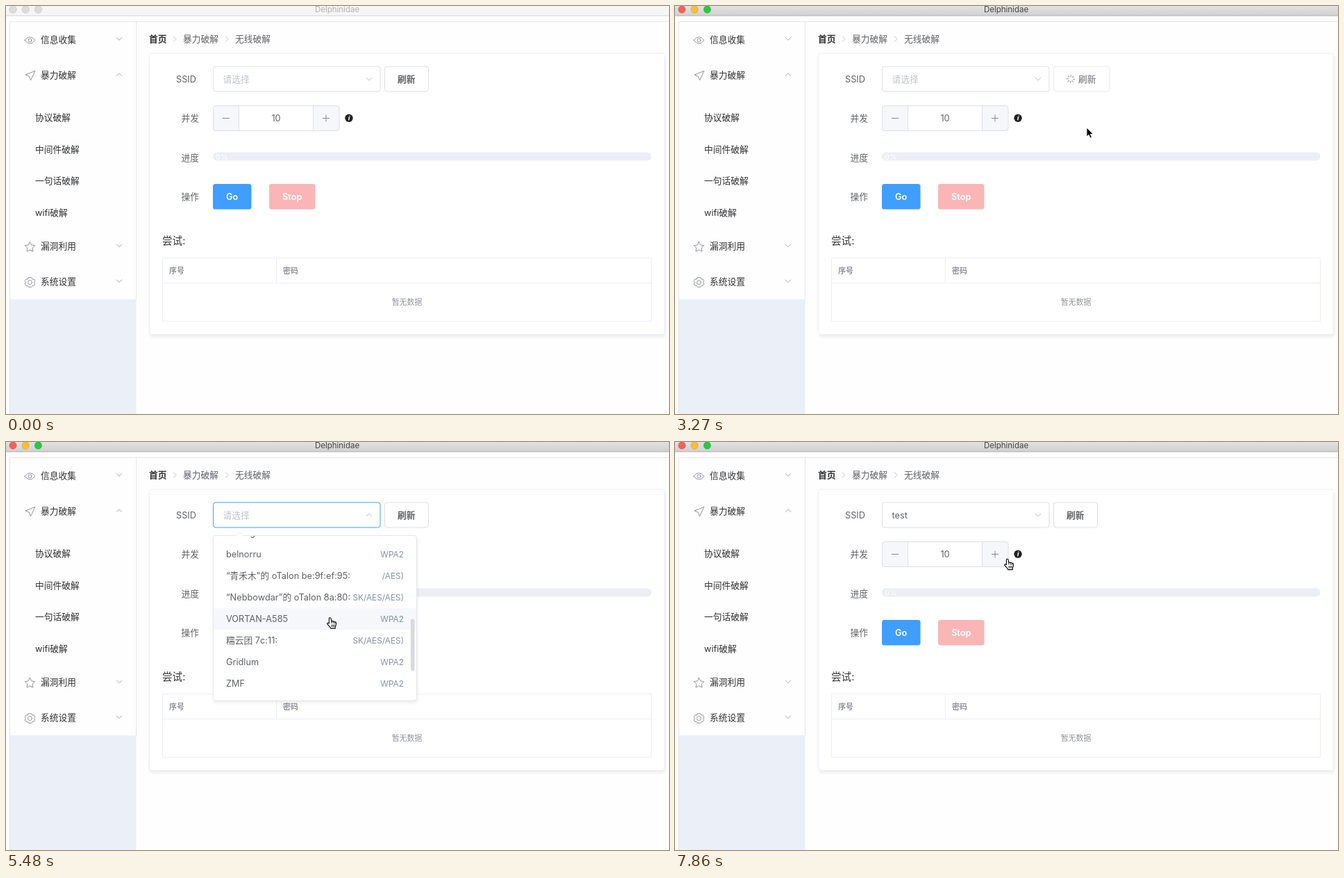
Recreate the animation shown at these times as an HTML page. Size 955 by 587 pixels, loop 8000 ms.

```html
<!DOCTYPE html>
<html lang="zh-CN">
<head>
<meta charset="utf-8">
<title>Delphinidae</title>
<style>
html, body { margin: 0; width: 100%; height: 100%; overflow: hidden; background: #fefefe; }
svg { display: block; width: 955px; height: 587px; }
text { font: 12.75px Inter, "Noto Sans CJK SC", "Noto Sans CJK", sans-serif; fill: #606266; white-space: pre; }
.dark { fill: #303133; }
.pale { fill: #c0c4cc; }
.small { font-size: 10.95px; fill: #909399; }
.bold { font-weight: 700; }
.medium { font-weight: 600; }
.kind { font-size: 11.85px; fill: #8492a6; }
.picked { font-weight: 700; }
.picked.name { fill: #409eff; }
.icon { fill: none; stroke: #909399; stroke-width: 1; stroke-linejoin: round; stroke-linecap: round; }
.card { filter: drop-shadow(1px 3px 2px rgba(0, 0, 0, .07)); }
</style>
</head>
<body>
<svg id="stage" viewBox="0 0 955 587"></svg>
<script>
const LOOP = 8000, ROW = 31, LIST_TOP = 140.5;

// Markup helpers
const rect = (x, y, w, h, fill, stroke = 'none', r = 0, more = '') =>
  `<rect x="${x}" y="${y}" width="${w}" height="${h}" rx="${r}" fill="${fill}" stroke="${stroke}" ${more}/>`;
const text = (x, mid, str, cls = '', more = '') =>
  `<text x="${x}" y="${mid + 4.6}" class="${cls}" ${more}>${str}</text>`;
const line = (d, stroke, more = '') => `<path d="${d}" fill="none" stroke="${stroke}" ${more}/>`;
const chevron = (x, y, turn = 0, stroke = '#a3a6ad', id = '') =>
  `<path ${id && `id="${id}"`} d="M-4 -2L0 2L4 -2" fill="none" stroke="${stroke}" transform="translate(${x} ${y}) rotate(${turn})"/>`;
const middle = 'text-anchor="middle"';

const networks = [
  'Zumfel-HQ', 'Antique', 'Zumfel-Web', 'TuvoK', 'VORTAN Pelm 9', 'Quelvo 9', 'Drolu', 'ZMF-WLAN',
  'Guest-5F', 'office', 'lobby_3A20', 'hall-ng', 'belnorru',
  ['“青禾木”的 oTalon be:9f:ef:95:', '/AES)'], ['“Nebbowdar”的 oTalon 8a:80:', 'SK/AES/AES)'],
  'VORTAN-A585', ['糯云团 7c:11:', 'SK/AES/AES)'], 'Gridlum', 'ZMF', 'ZMF-APP', 'Dovel_6028', 'test', 'set'
].map(n => Array.isArray(n) ? n : [n, 'WPA2']);

const titleBar = `
  <linearGradient id="bar" x2="0" y2="1"><stop stop-color="#e2e2e2"/><stop offset="1" stop-color="#d0d0d0"/></linearGradient>
  ${['#f6f6f6', 'url(#bar)'].map((fill, on) => `<g id="bar${on}">
    ${rect(0, 0, 955, 14, fill)}${line('M0 14H955', on ? '#b2b2b2' : '#d4d4d4')}
    ${['#fc5f57', '#fdbd2f', '#28c940'].map((c, i) =>
      `<circle cx="${10 + 18.2 * i}" cy="5" r="5.3" fill="${on ? c : '#dcdcdc'}" stroke="${on ? '#0002' : '#cfcfcf'}" stroke-width=".8"/>`).join('')}
    ${text(477, 4.7, 'Delphinidae', '', `${middle} style="font-size:11.5px;fill:${on ? '#454545' : '#b2b2b2'}"`)}
  </g>`).join('')}`;

const star = Array.from({length: 10}, (_, i) => {
  const a = (i / 5 - .5) * Math.PI, r = i % 2 ? 3.9 : 7.6;
  return `${(34.5 + r * Math.cos(a)).toFixed(1)} ${(347 + r * Math.sin(a)).toFixed(1)}`;
}).join('L');

const sidebar = `
  ${rect(5, 422, 182.5, 165, '#ebeff8')}
  ${rect(5.5, 274.5, 182, 45.5, '#e8f3fe', 'none', 0, 'id="menuGlow"')}
  ${line('M955 22.5H5.5V587M187.5 22.5V422', '#e6e6e6')}
  ${[['信息收集', 48], ['暴力破解', 99.5], ['漏洞利用', 345.5], ['系统设置', 396.5]].map(([s, y], i) =>
    text(50, y, s, 'dark') + chevron(163, y - .8, i === 1 ? 180 : 0)).join('')}
  ${['协议破解', '中间件破解', '一句话破解', 'wifi破解'].map((s, i) => text(42, 160.3 + 45.6 * i, s, 'dark')).join('')}
  <g class="icon">
    <path d="M27 49.3Q34.5 39.8 42 49.3Q34.5 58.8 27 49.3Z"/><circle cx="34.5" cy="49.3" r="2.4"/>
    <path d="M41.5 93.5L28 99L33.3 101L35.5 106.5Z"/>
    <path d="M${star}Z"/>
    <path d="M32.3 390.8H36.7L38 393L40.4 393L41.8 395.6L40.4 397.6L41.8 400L40.2 402.3L38 402.3L36.7 404.4H32.3L31 402.3L28.8 402.3L27.2 400L28.6 397.6L27.2 395.6L28.6 393L31 393Z"/>
    <circle cx="34.5" cy="397.6" r="3"/>
  </g>`;

const refresh = (id, w, fill, stroke, ink, x, more = '') => `<g id="${id}">
  ${rect(545.5, 87, w, 36, fill, stroke, 3.6)}${text(x, 105, '刷新', 'medium', `style="fill:${ink}"`)}${more}</g>`;
const rays = Array.from({length: 8}, (_, i) =>
  `<path d="M0 -3V-5.8" stroke="#96989c" stroke-width="1.1" transform="rotate(${45 * i})"/>`).join('');

const form = `
  ${text(206, 47.5, '首页', 'dark bold')}${chevron(243, 47.5, -90, '#c0c4cc')}
  ${text(255, 47.5, '暴力破解')}${chevron(318, 47.5, -90, '#c0c4cc')}${text(330, 47.5, '无线破解')}
  ${rect(206.5, 68, 742, 404.5, '#fff', '#ebeef5', 3.6, 'class="card"')}
  ${text(245, 105, 'SSID')}
  ${['并发', '进度', '操作'].map((s, i) => text(252.5, 161.5 + 56.4 * i, s)).join('')}
  ${rect(298.5, 87, 240.5, 36, '#fff', '#dcdfe6', 3.6, 'id="select"')}
  ${text(312.5, 105, '请选择', 'pale', 'id="hint"')}${text(312.5, 105, 'test', '', 'id="value"')}
  ${chevron(523, 105, 0, '#c0c4cc', 'selectArrow')}
  ${refresh('idle', 63, '#fff', '#dcdfe6', '#606266', 564)}
  ${refresh('hover', 63, '#ecf5ff', '#c6e2ff', '#409eff', 564)}
  ${refresh('loading', 80.5, '#fff', '#e8eaef', '#97999c', 581, `<g id="spinner">${rays}</g>`)}
  ${rect(298.5, 143.5, 181.5, 36, '#f5f7fa', '#dcdfe6', 3.6)}${rect(335.5, 143.5, 107, 36, '#fff', '#dcdfe6')}
  ${text(389, 161.5, '10', '', middle)}
  ${line('M312 161.5H322M456 161.5H466M461 156.5V166.5', '#85888e')}
  <circle cx="494" cy="161.2" r="5.7" fill="#222"/>
  <path d="M493.4 160.2H494.6L493.6 164.3M494.9 157.6V158.4" fill="none" stroke="#fff" stroke-width="1.4"/>
  ${rect(298, 210.5, 631.5, 12, '#ebeef5', 'none', 6)}
  ${text(302, 216.3, '0%', '', 'style="font-size:10.95px;fill:#fff"')}
  ${rect(298, 256, 55.5, 36.5, '#409eff', 'none', 3.6)}${text(325.7, 274.3, 'Go', 'medium', `${middle} style="fill:#fff"`)}
  ${rect(379, 256, 66.5, 36.5, '#fab6b6', 'none', 3.6)}${text(412.2, 274.3, 'Stop', 'medium', `${middle} style="fill:#fff"`)}
  ${text(225, 338, '尝试:', 'dark', 'style="font-size:14.6px"')}
  ${line('M225.5 362.5H929.5V453.5H225.5ZM225.5 398.5H929.5M389.5 362.5V398.5', '#ebeef5')}
  ${text(235, 380, '序号', 'small bold')}${text(399, 380, '密码', 'small bold')}
  ${text(577.5, 425.8, '暂无数据', 'small', middle)}`;

const dropdown = `
  <clipPath id="view"><rect x="299" y="135" width="292" height="236.5" rx="3"/></clipPath>
  <g id="dropdown">
    <g class="card">${rect(298.5, 134.5, 293, 237.5, '#fff', '#e4e7ed', 3.6)}</g>
    <path d="M330.5 135L336 129.5L341.5 135" fill="#fff" stroke="#ebeef5"/>${rect(331, 135, 10, 2, '#fff')}
    <g clip-path="url(#view)">
      <g id="list">
        ${rect(299, 0, 292, ROW, '#f5f7fa', 'none', 0, 'id="rowGlow"')}
        ${networks.map(([name, kind], i) => {
          const y = LIST_TOP + ROW * (i + .5), extra = name === 'test' ? ' pickable' : '';
          return text(317, y, name, 'name' + extra) + text(573, y - .2, kind, 'kind' + extra, 'text-anchor="end"');
        }).join('')}
      </g>
      ${rect(583, 137, 5.5, 75, '#d9dadd', 'none', 2.75, 'id="thumb"')}
    </g>
  </g>`;

const cursors = `<g id="cursor">
  <path id="arrow" d="M0 0V13L3 10.3L5.2 15L7.4 14L5.3 9.4H9.4Z" fill="#000" stroke="#fff" stroke-width=".9"/>
  <g id="hand" fill="#fff" stroke="#000" stroke-width="1.1" stroke-linejoin="round" stroke-linecap="round">
    <path d="M-1.6 8.6V1.6Q-1.4 0 0 .3Q1 .5 1.2 2L1.7 5.4Q3.2 4.3 4.2 5.8Q5.6 4.9 6.5 6.4Q8.4 6 8.5 8Q8.6 11.5 7.2 13.5V15.6H.6L-.2 13.8L-4.2 9.4Q-4.6 7.8 -3.2 7.8Z"/>
    <path d="M1.8 5.6V8M4.3 6V8.2M6.6 6.6V8.5M2.2 10.5V13.3M4.2 10.5V13.3M6.1 10.5V13.3" stroke-width=".9"/>
  </g></g>`;

document.getElementById('stage').innerHTML = titleBar + sidebar + form + dropdown + cursors;
const el = Object.fromEntries([...document.querySelectorAll('[id]')].map(n => [n.id, n]));
const pickable = document.querySelectorAll('.pickable');

// Tracks: [time, value, ...]
const pointer = [
  [500, 30, 304], [640, 70, 297], [900, 80, 297], [1080, 200, 235], [1230, 400, 135], [1360, 530, 112],
  [1490, 586, 106], [1940, 586, 106], [2530, 593, 175], [3570, 593, 175], [3720, 588, 160], [4010, 500, 106],
  [4300, 490, 108], [4740, 467, 244], [4880, 467, 249], [5470, 467, 252.5], [5920, 467, 252.5],
  [6350, 404, 322], [7260, 404, 322], [7840, 479, 168]
];
const scrolling = [[4900, 0], [5040, 26], [5190, 130], [5335, 262], [5482, 366], [5630, 446], [5775, 488]];
const opening = [[4160, 0], [4450, 1], [6670, 1], [6960, 0]];
const glowing = [[630, 0], [640, 1], [1600, 1], [1940, 0]];

function at(track, t) {
  if (t <= track[0][0]) return track[0].slice(1);
  const i = track.findIndex(k => k[0] > t);
  if (i < 0) return track.at(-1).slice(1);
  const a = track[i - 1], b = track[i], p = (t - a[0]) / (b[0] - a[0]);
  return a.slice(1).map((v, j) => v + (b[j + 1] - v) * p);
}

function tick(t) {
  if (t < 500) return 0;
  const [start, step] = t < 1500 ? [500, 143] : [1500, 147.5];
  return start + step * Math.floor((t - start + 3) / step);
}

const within = (t, ...spans) => spans.some(([a, b]) => t >= a && t < b);
const show = (node, on) => node.setAttribute('display', on ? 'inline' : 'none');

function draw(t) {
  const [x, y] = at(pointer, t), [scroll] = at(scrolling, t), [open] = at(opening, t);
  const focused = t >= 640, chosen = t >= 6500;
  show(el.bar0, !focused);
  show(el.bar1, focused);
  el.menuGlow.setAttribute('opacity', at(glowing, t)[0]);

  const loading = within(t, [1930, 3410]), hover = within(t, [1370, 1930]);
  show(el.loading, loading);
  show(el.hover, hover);
  show(el.idle, !loading && !hover);
  el.spinner.setAttribute('transform', `translate(570 105) rotate(${t * .18})`);

  el.select.setAttribute('stroke', within(t, [4150, 7540]) ? '#409eff'
    : within(t, [1220, 1640], [3860, 4150]) ? '#c0c4cc' : '#dcdfe6');
  el.selectArrow.setAttribute('transform', `translate(523 105) rotate(${within(t, [4150, 6750]) ? 180 : 0})`);
  show(el.hint, !chosen);
  show(el.value, chosen);

  show(el.dropdown, open > .02);
  el.dropdown.setAttribute('opacity', open);
  el.dropdown.setAttribute('transform', `translate(0 ${134 * (1 - open)}) scale(1 ${open})`);
  el.list.setAttribute('transform', `translate(0 ${-scroll})`);
  el.thumb.setAttribute('y', 137 + scroll / 234 * 75);
  const row = Math.floor((y - LIST_TOP + scroll) / ROW);
  show(el.rowGlow, row >= 0);
  el.rowGlow.setAttribute('y', LIST_TOP + row * ROW);
  pickable.forEach(n => n.classList.toggle('picked', chosen));

  const hand = within(t, [640, 1000], [1220, 1930], [3860, 6640], [7690, LOOP]);
  show(el.cursor, t >= 500);
  show(el.hand, hand);
  show(el.arrow, !hand);
  el.cursor.setAttribute('transform', `translate(${x} ${y})`);
}

const began = performance.now();
function frame() {
  draw(tick((performance.now() - began) % LOOP));
  requestAnimationFrame(frame);
}
frame();
</script>
</body>
</html>
```
